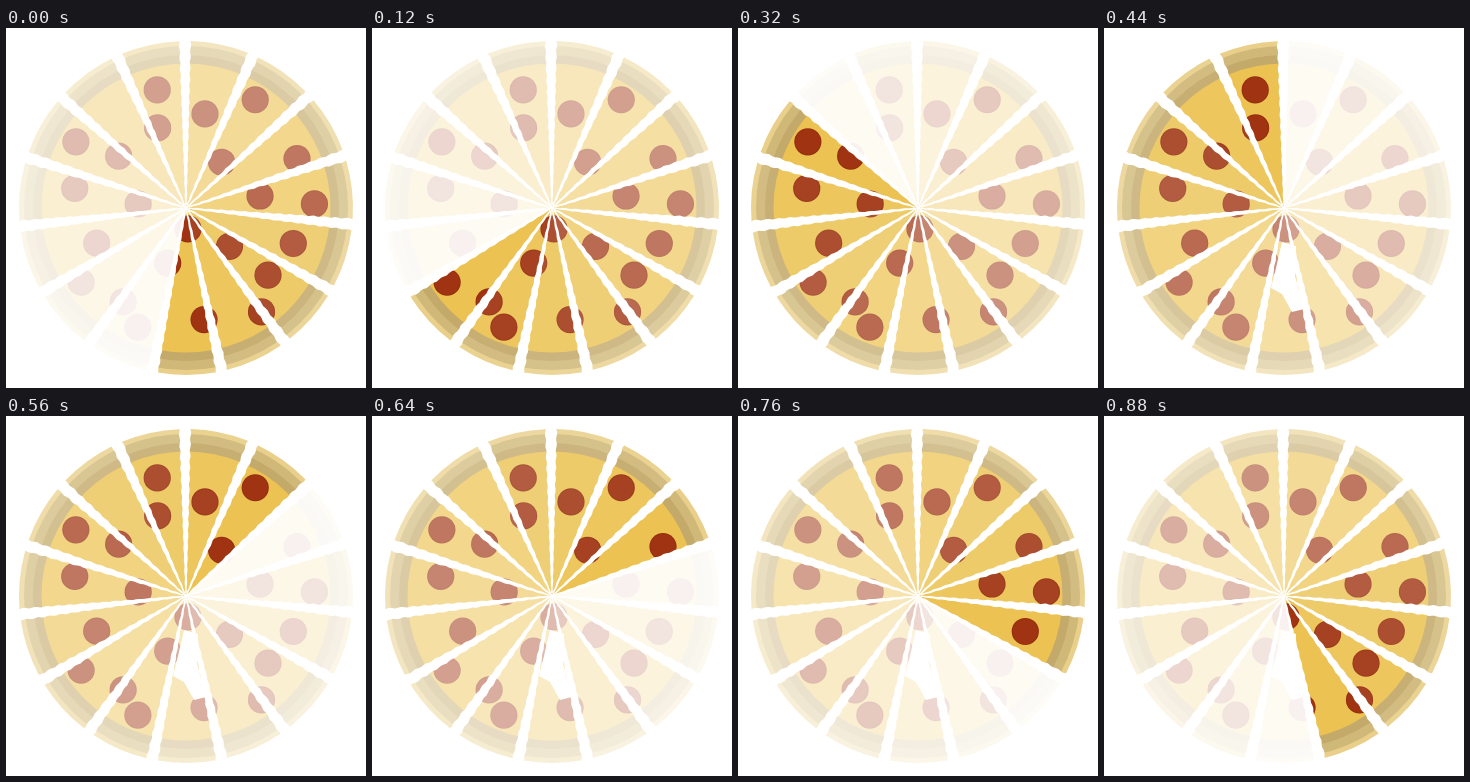
An HTML page with a canvas for the animation above (960 ms loop, 360x360 px).

```html
<!DOCTYPE html>
<html>
<head>
<meta charset="utf-8">
<style>
  html, body { margin: 0; width: 100%; height: 100%; overflow: hidden; background: #fff; }
  canvas { display: block; }
</style>
</head>
<body>
<canvas id="stage" width="360" height="360"></canvas>
<script>
const SIZE = 360, C = SIZE / 2, R = 167, TAU = Math.PI * 2;
const SLICES = 15, STEP = TAU / SLICES, FIRST_CUT = -0.006, START = 7;
const LOOP = 960, TICK = 40;
const ctx = document.getElementById('stage').getContext('2d');

// Angles in degrees, clockwise from the top, by distance from the centre
const toppings = {
  128.5: [32.6, 88.2, 144, 202, 234.7, 301],
  121.5: [66, 346.3],
  113: [108.3, 170.8, 213.8, 280],
  106: [129.3],
  96: [11.4, 248.5],
  85: [307.6, 340.5],
  75: [80.8],
  58: [37.9, 131.4, 198.4],
  48: [274.8],
  21: [174.6]
};

// Torn spot near the middle, open during the second half of the loop
const tear = new Path2D('M178 214L192 218 191 248 200 281 188 284 178 266 167 260 172 240Z');

const polar = (angle, r, side = 0) => [
  C + r * Math.sin(angle) + side * Math.cos(angle),
  C - r * Math.cos(angle) + side * Math.sin(angle)
];

function disc(g, x, y, r, color) {
  g.fillStyle = color;
  g.beginPath();
  g.arc(x, y, r, 0, TAU);
  g.fill();
}

function bakePizza() {
  const canvas = document.createElement('canvas');
  canvas.width = canvas.height = SIZE;
  const g = canvas.getContext('2d');
  disc(g, C, C, R + 1, '#e9cf8a');
  disc(g, C, C, 162, '#cfb878');
  disc(g, C, C, 153, '#c3a96a');
  disc(g, C, C, 144.5, '#ecc353');
  for (const [r, angles] of Object.entries(toppings)) {
    for (const degrees of angles) {
      const [x, y] = polar(degrees * TAU / 360, +r);
      disc(g, x, y, 13.6, '#942e0e');
      disc(g, x, y, 12.6, '#a03412');
    }
  }
  return canvas;
}

// Ragged wedge; the gap to its neighbours widens towards the rim
function slicePath(i) {
  const path = new Path2D();
  const from = FIRST_CUT + i * STEP, to = from + STEP;
  const gap = r => 0.6 + r * 0.031 + (0.2 + r / R * 0.4) * Math.sin(r * 0.55 + i * 2.3);
  for (let r = 2; r <= R; r += 3) path.lineTo(...polar(from, r, gap(r)));
  path.arc(C, C, R, from + 0.034 - TAU / 4, to - 0.034 - TAU / 4);
  for (let r = R; r >= 2; r -= 3) path.lineTo(...polar(to, r, -gap(r)));
  path.closePath();
  return path;
}

const pizza = bakePizza();
const slices = Array.from({ length: SLICES }, (_, i) => slicePath(i));

function draw(time) {
  // Steps of 64 ms, snapped down to 40 ms ticks
  const tick = Math.floor(time % LOOP / TICK);
  const step = Math.ceil((tick + 1) * TICK * SLICES / LOOP) - 1;
  ctx.fillStyle = '#fff';
  ctx.fillRect(0, 0, SIZE, SIZE);
  slices.forEach((slice, i) => {
    const age = (START + step - i + SLICES) % SLICES;
    ctx.save();
    ctx.clip(slice);
    ctx.globalAlpha = 1 - age / SLICES;
    ctx.drawImage(pizza, 0, 0);
    ctx.restore();
  });
  if (step >= START) ctx.fill(tear);
}

const begin = performance.now();
function frame() {
  draw(performance.now() - begin);
  requestAnimationFrame(frame);
}
frame();
</script>
</body>
</html>
```
